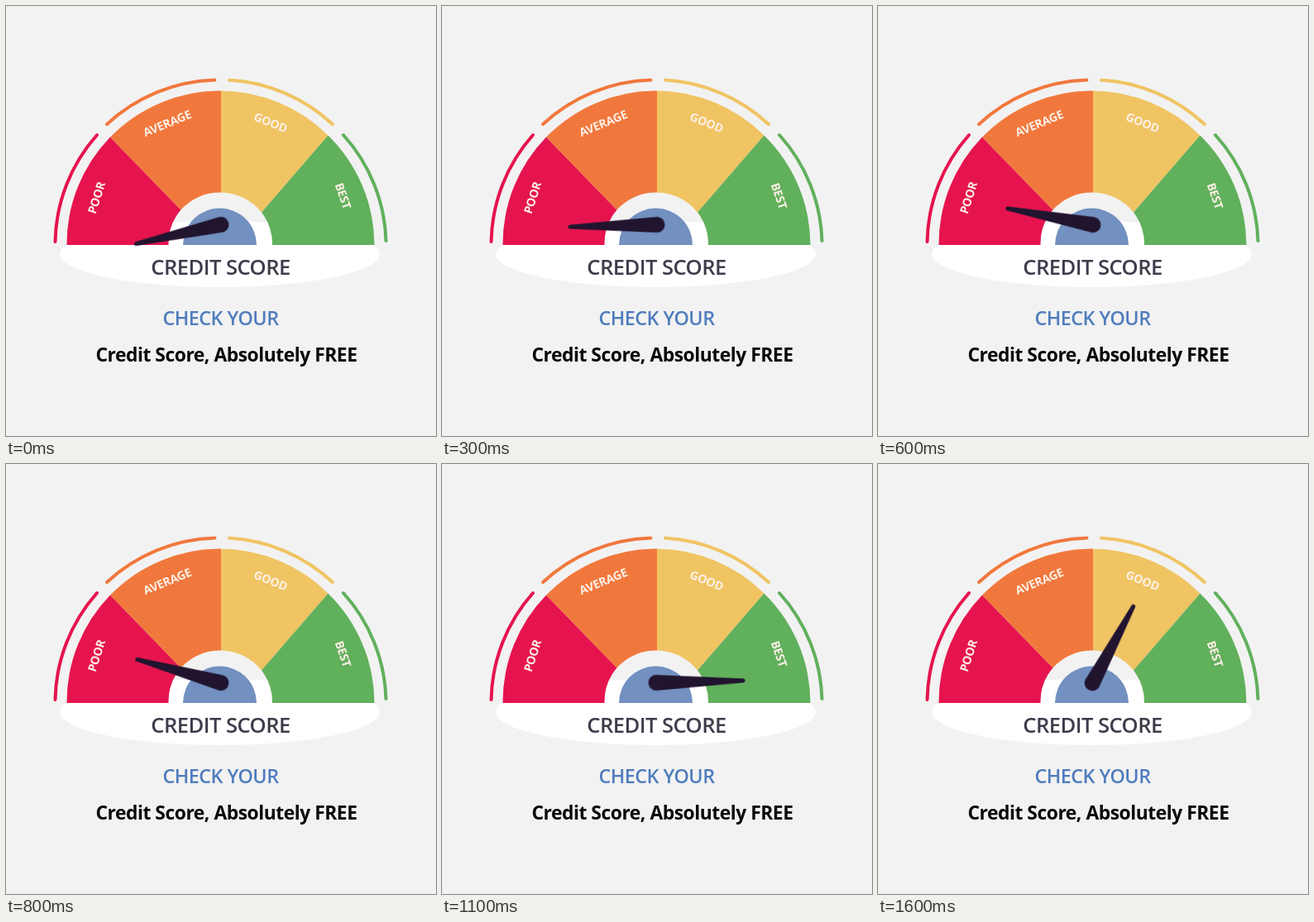
An HTML page for the animation above (1700 ms loop, 520x520 px).

```html
<!DOCTYPE html>
<html lang="en">
<head>
<meta charset="utf-8">
<title>Credit Score</title>
<style>
  html, body { margin: 0; width: 100%; height: 100%; overflow: hidden; background: #f2f2f2; }
  svg { display: block; width: 100%; height: 100%; }
  text { font-family: "Open Sans", "Noto Sans", sans-serif; font-weight: 600; text-anchor: middle; letter-spacing: -.022em; }
  .labels text { font-size: 14.2px; font-weight: 700; fill: #fdf0e6; }
  .rim { fill: none; stroke-width: 4; stroke-linecap: round; }
  .needle { fill: #21142f; animation: swing 1.7s step-end infinite; }

  /* one pose every 100 ms */
  @keyframes swing {
    0%      { transform: rotate(-12.7deg); animation-timing-function: steps(3); }
    17.647% { transform: rotate(-1.4deg);  animation-timing-function: steps(2); }
    29.411% { transform: rotate(8.4deg);   animation-timing-function: steps(3); }
    47.058% { transform: rotate(15.6deg);  animation-timing-function: steps(2); }
    58.823% { transform: rotate(187deg); }
    64.705% { transform: rotate(178.6deg); animation-timing-function: steps(2); }
    76.470% { transform: rotate(137.7deg); }
    82.352% { transform: rotate(129deg); }
    88.235% { transform: rotate(122.5deg); }
    94.117%, 100% { transform: rotate(118.1deg); }
  }
</style>
</head>
<body>
<svg viewBox="0 0 520 520">
  <rect width="520" height="520" fill="#f2f2f2"/>
  <ellipse cx="258.5" cy="300" rx="193.5" ry="40" fill="#fff"/>

  <!-- dial -->
  <path fill="#e6144e" d="M73.5 289A186 186 0 0 1 126 158.500L211.500 246.500A63 63 0 0 0 196.500 289Z"/>
  <path fill="#f1783d" d="M126 158.500A186 186 0 0 1 260 102.500V225.500A63 63 0 0 0 211.500 246.500Z"/>
  <path fill="#f0c463" d="M260 102.500A186 186 0 0 1 389.500 156.500L309 249.500A63 63 0 0 0 260 225.500Z"/>
  <path fill="#61b05c" d="M389.500 156.500A186 186 0 0 1 445.500 289H322A63 63 0 0 0 309 249.500Z"/>
  <path fill="#7290c0" d="M214 289A44.500 44.500 0 0 1 303 289Z"/>

  <g class="rim">
    <path stroke="#e6144e" d="M59.500 285A200 200 0 0 1 110 156"/>
    <path stroke="#f1783d" d="M122 143A200 200 0 0 1 252.500 89.500"/>
    <path stroke="#f0c463" d="M270 89.500A200 200 0 0 1 395 143"/>
    <path stroke="#61b05c" d="M408 156A200 200 0 0 1 459.500 284"/>
  </g>

  <g class="labels">
    <text transform="translate(109.500 232) rotate(-72)" y="5">POOR</text>
    <text transform="translate(195 142) rotate(-22.500)" y="5">AVERAGE</text>
    <text transform="translate(320 141) rotate(22)" y="5">GOOD</text>
    <text transform="translate(407.500 229.500) rotate(71)" y="5">BEST</text>
  </g>

  <text x="259.500" y="325" font-size="25.6" fill="#403b4b">CREDIT SCORE</text>
  <text x="259.500" y="385.500" font-size="23.4" fill="#4f7cbd">CHECK YOUR</text>
  <text x="266.500" y="429.500" font-size="22.9" style="font-weight: 700" fill="#0a0a0a">Credit Score, Absolutely FREE</text>

  <g transform="translate(259.500 264.500)">
    <path class="needle" d="M-104.500-2.500L.5-9.500A9.500 9.500 0 0 1 .5 9.500L-104.500 2.500A2.500 2.500 0 0 1-104.500-2.500Z"/>
  </g>
</svg>
</body>
</html>
```
